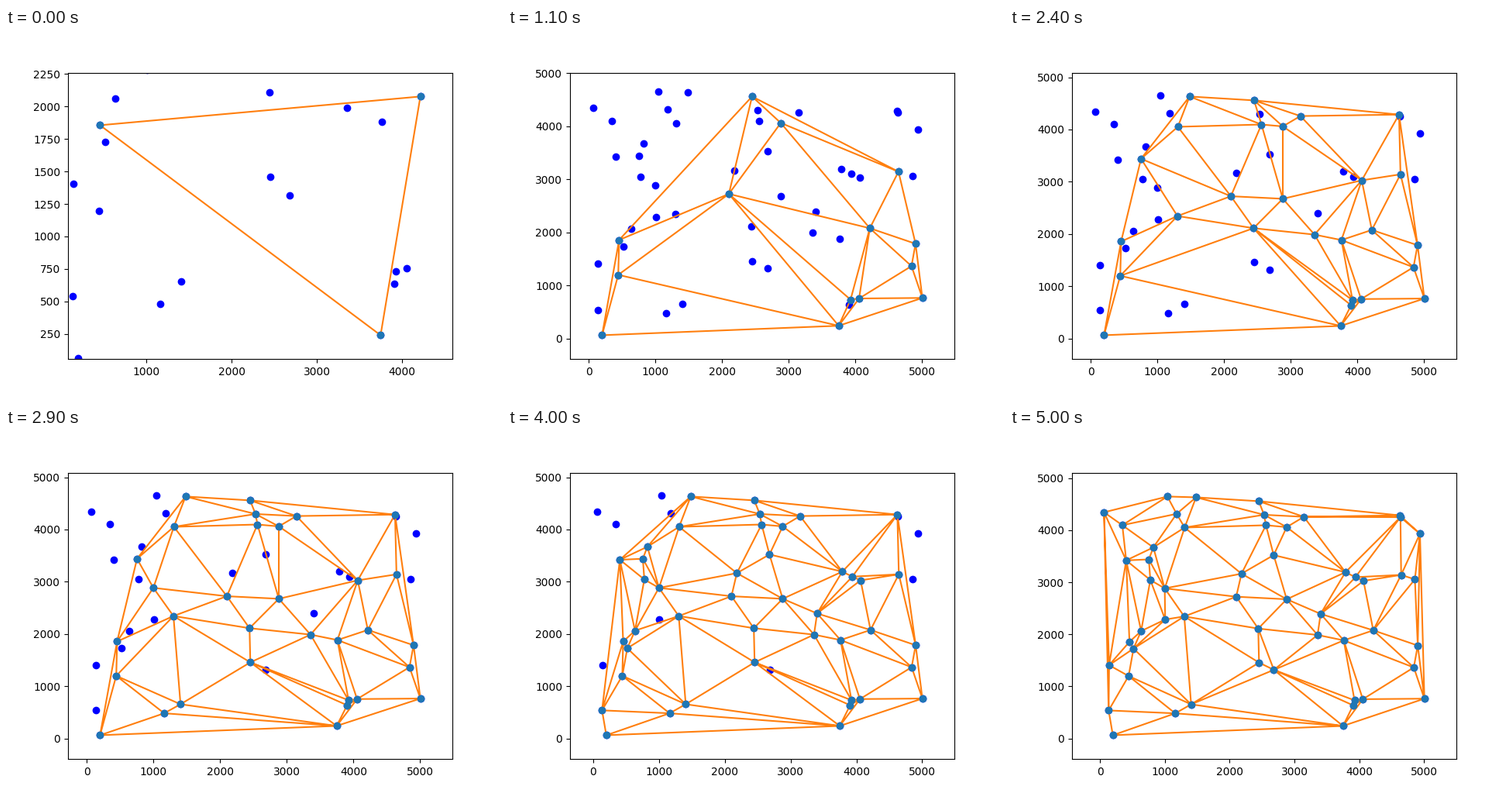
A matplotlib script for the animation above (5.1 s loop, 640 px wide and 480 px high).

```python
import numpy as np
import matplotlib.pyplot as plt
from matplotlib.animation import FuncAnimation
from matplotlib.tri import Triangulation

# Sites in the order in which they join the triangulation
SITES = np.array([
    (455, 1856), (4215, 2077), (3748, 240),
    (5003, 764), (199, 62), (3926, 732), (4645, 3142), (4901, 1785),
    (4840, 1364),
    (2101, 2723), (4054, 754), (2449, 4558), (442, 1199), (2880, 4060),
    (4064, 3027), (2441, 2111), (3759, 1884), (2880, 2674), (3356, 1988),
    (2560, 4096), (1300, 2344),
    (3144, 4258), (4623, 4286), (754, 3440), (1482, 4632), (1306, 4052),
    (3905, 636),
    (2453, 1457), (1161, 482), (2531, 4297), (1406, 655), (999, 2883),
    (518, 1727), (635, 2063), (134, 538), (823, 3670),
    (2183, 3165), (3403, 2393), (3939, 3098), (405, 3421), (2679, 3522),
    (777, 3044), (3786, 3194),
    (63, 4345), (1006, 2285), (4935, 3933), (2682, 1318), (1040, 4648),
    (345, 4097), (4857, 3056), (1182, 4315), (141, 1408), (4634, 4251),
], dtype=float)

START = 3
MARGIN = 0.1
FRAMES = len(SITES) - START + 1

fig, ax = plt.subplots(figsize=(6.4, 4.8), dpi=100)
ax.plot(*SITES.T, 'bo', zorder=1)
mesh, = ax.plot([], [], '-', color='C1', zorder=1.5)
nodes, = ax.plot([], [], 'o', color='C0', zorder=2)


def padded(values):
    low, high = values.min(), values.max()
    pad = MARGIN * (high - low)
    return low - pad, high + pad


def edge_path(x, y):
    """Delaunay edges as one path, with gaps between the segments."""
    edges = Triangulation(x, y).edges
    gap = np.full((len(edges), 1), np.nan)
    return [np.hstack([v[edges], gap]).ravel() for v in (x, y)]


def update(step):
    x, y = SITES[:START + step].T
    mesh.set_data(*edge_path(x, y))
    nodes.set_data(x, y)
    ax.set_xlim(padded(x))
    ax.set_ylim(padded(y))
    return mesh, nodes


anim = FuncAnimation(fig, update, frames=FRAMES, interval=100,
                     repeat=True, repeat_delay=0, blit=False)
plt.show()
```
